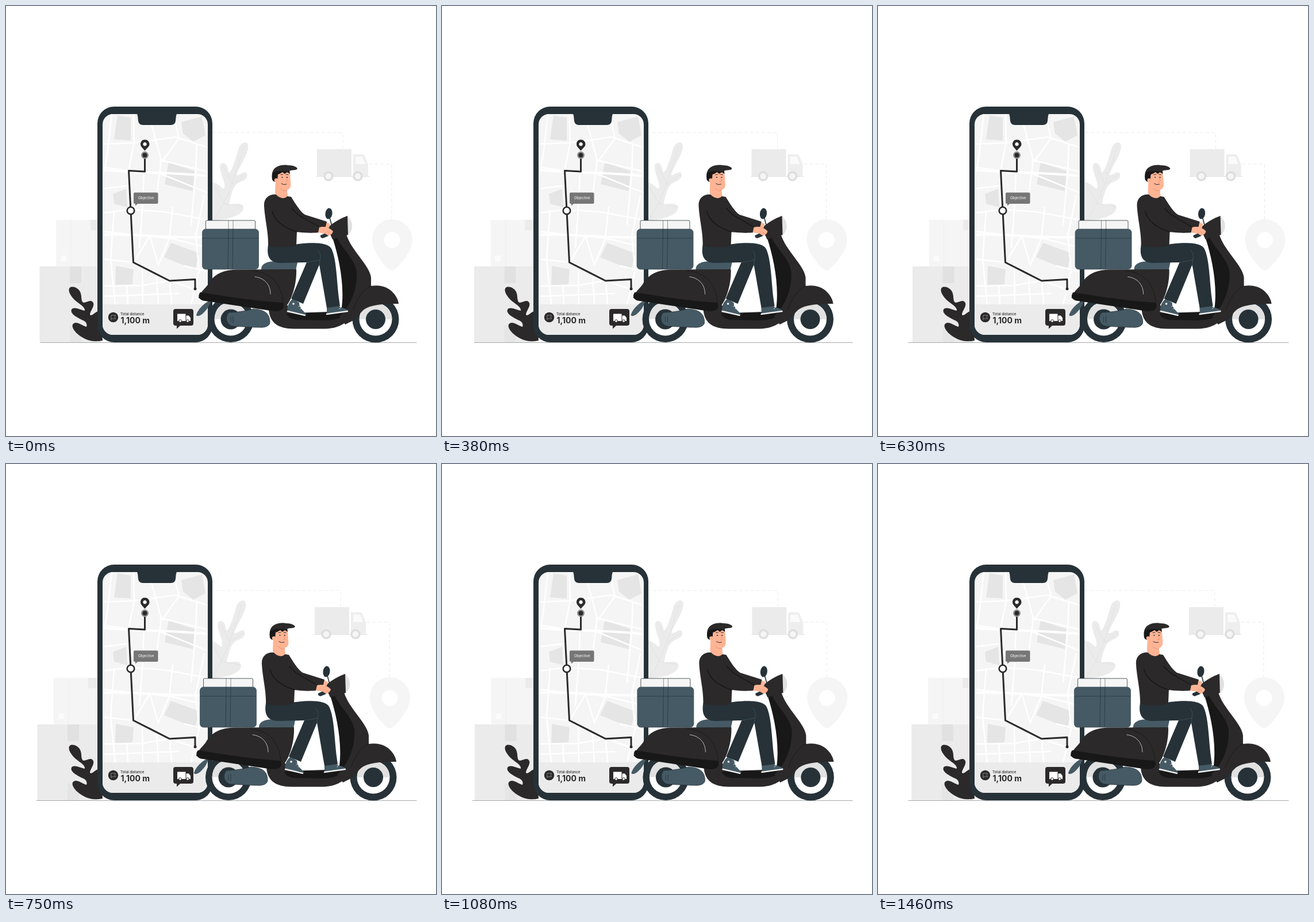
An HTML page for the animation above (1500 ms loop, 748 by 748 pixels).

```html
<!DOCTYPE html>
<html lang="en">
<head>
<meta charset="utf-8">
<style>
html, body { margin: 0; height: 100%; overflow: hidden; background: #fff; }
svg { display: block; width: 100vw; height: 100vh; }
text { font-family: Inter, "Open Sans", sans-serif; }
.ink { fill: #2b2929; }
.navy { fill: #263238; }
.slate { fill: #455a64; }
.black { fill: #191818; }
.skin { fill: #ffb494; }
.g1 { fill: #f5f5f5; }
.g2 { fill: #ebebeb; }
.g3 { fill: #e1e1e1; }
.white { fill: #fff; }
.line { fill: none; stroke-linecap: round; stroke-linejoin: round; }
</style>
</head>
<body>
<svg viewBox="0 0 748 748">
<defs>
  <clipPath id="screen"><rect x="168" y="188" width="183" height="384" rx="18"/></clipPath>
</defs>

<g class="shake">
  <path class="line" d="M359 220H586V249M632 275H671V372" stroke="#ebebeb" stroke-dasharray="5 5" stroke-linecap="butt"/>
  <!-- parcels -->
  <path class="g1" d="M87 372H165V453H87Z"/>
  <path class="g2" d="M147 372H165V390H147Z"/>
  <path class="line" d="M113 373V452" stroke="#ededed" stroke-width=".8"/>
  <path fill="#fbfbfb" d="M95 434H105V444H95Z"/>
  <path class="g2" d="M58.5 453H165V585H58.5Z"/>
  <path class="g3" d="M111 453H131V482H111Z"/>
  <path fill="#e5e5e5" d="M111 556H131V585H111Z"/>
  <!-- pale leaf -->
  <path class="g2" d="M404 250C408 235 424 232 421 248C418 264 402 285 401 294C406 296 416 284 419 292C422 301 412 304 404 308C394 313 390 335 388 345C396 345 412 341 413 350C414 362 392 373 350 374V306C362 304 372 312 378 318C382 316 380 308 378 302C374 290 368 275 377 273C386 273 386 288 388 290C394 286 400 264 404 250Z"/>
  <path class="line" d="M362 372C385 340 400 290 414 245M394 310L378 279M394 310L416 294M380 344L362 312M380 344L411 349" stroke="#dedede" stroke-width=".7"/>
  <!-- van -->
  <path class="g2" d="M541 249H601V297H541Z"/>
  <path fill="#eee" d="M604 297V258H619Q623 258 624 261L630 276V297Z"/>
  <path fill="#fafafa" d="M608 262H620L625 275H608Z"/>
  <path class="line" d="M540 296.500H632" stroke="#e1e1e1" stroke-width="1.200"/>
  <g class="g1" stroke="#dedede" stroke-width="3.500"><circle cx="561" cy="296" r="7"/><circle cx="612" cy="296" r="7"/></g>
  <path class="g1" fill-rule="evenodd" d="M671.500 371C691 371 707 387 707 407C707 425 688 449 676 458Q671.500 462 667 458C655 449 637 425 637 407C637 387 652 371 671.500 371ZM671.500 393a14 14 0 1 0 .1 0Z"/>
</g>

<path id="ground" class="line" stroke="#8f9497" stroke-width=".8"/>

<!-- dark leaf -->
<path class="ink" d="M168 582C152 585 142 582 132 576C117 567 112 555 118 552C124 548 134 557 140 558C142 552 138 548 132 546C122 541 111 535 114 528C118 522 130 529 137 530C138 524 130 520 124 515C114 508 106 495 111 490C116 486 128 491 130 500C132 506 130 514 135 516C140 516 146 511 150 514C157 520 146 530 146 537C150 541 155 530 165 530Z"/>

<!-- phone -->
<rect class="navy" x="159" y="175" width="200" height="410" rx="29"/>
<g clip-path="url(#screen)">
  <path class="g1" d="M168 188H351V572H168Z"/>
  <path fill="#e5e5e5" d="M194 190L217 194V234L188 232ZM305 202L341 192L347 225L326 236L308 222ZM283 272L328 287L325 322L276 310ZM186 327L209 318L211 350L188 344ZM287 412L336 430L329 459L275 437ZM191 452L222 458L220 484L190 487Z"/>
  <path class="line" stroke="#fff" stroke-width="2.500" d="M184 188L176 260L168 300M168 240L222 238L295 228L351 246M222 188L223 238L213 287M248 188L270 268L262 330M295 206L301 230L272 270M168 280L213 287L265 290L351 325M268 268L351 288M332 240L330 290L322 380M168 318L216 312L217 356M168 360L217 354L275 358L350 372M240 290L237 356L232 420M168 392L220 398M188 356L182 440L190 519M168 440L222 446L250 400L290 405L351 420M250 400L265 450M168 487L237 486L284 478L351 500M237 450L238 519M262 470L265 519M290 350L284 405L265 450M345 330L330 400L336 460L322 519M210 486L212 519M351 462L310 452M285 480L288 519M168 505L300 500"/>
  <path class="line" stroke="#fff" stroke-width="4" d="M168 285C230 292 290 288 351 296M168 398C220 395 280 405 351 402"/>
  <path class="g2" d="M168 519H351V572H168Z"/>
  <path class="navy" d="M225 185C230 188 229 192 230 200Q231 207 238 207H287Q294 207 295 200C296 192 295 188 300 185Z"/>
</g>
<path class="line" d="M241.500 260V288L213.500 286.500L221.500 446L284.500 478L329 475.500V492" stroke="#2b2929" stroke-width="3"/>
<circle class="ink" cx="329" cy="492" r="2.500"/>
<circle cx="241.500" cy="259.500" r="6.500" fill="#8f8f8f"/><circle class="ink" cx="241.500" cy="259.500" r="4"/>
<path class="ink" fill-rule="evenodd" d="M241.500 232.500C246 232.500 249.500 236 249.500 240.500C249.500 245 244 248 241.500 252C239 248 234 245 234 240.500C234 236 237 232.500 241.500 232.500ZM241.500 237a3.300 3.300 0 1 0 .1 0Z"/>
<circle class="white" cx="217" cy="356" r="6.300" stroke="#2b2929" stroke-width="2.600"/>
<path fill="#767676" d="M224 324.500H262.500Q264.500 324.500 264.500 326.500V342Q264.500 344 262.500 344H229L225 347.500V344H224Q222 344 222 342V326.500Q222 324.500 224 324.500Z"/>
<text x="230" y="336.300" font-size="6.200" fill="#fff">Objective</text>
<circle class="ink" cx="186.500" cy="541.500" r="8.700"/>
<path class="line" d="M183 546V538H190.500L189 541L190.500 544H183" stroke="#999" stroke-width=".8"/>
<text class="ink" x="199" y="537.700" font-size="6.200" font-weight="500">Total distance</text>
<text class="ink" x="199.500" y="552" font-size="14" font-weight="700">1,100 m</text>
<path class="ink" d="M295 527H322Q326 527 326 531V552Q326 556 322 556H303L297 561.500V556H295Q291 556 291 552V531Q291 527 295 527Z"/>
<path class="white" d="M298 535.500H312.500V548H298ZM313.500 538.500H318L321 542.500V548H313.500Z"/>
<g class="white" stroke="#2b2929"><circle cx="303" cy="548" r="2.300"/><circle cx="316" cy="548" r="2.300"/></g>

<g class="shake">
  <!-- wheels -->
  <g class="navy"><circle cx="391" cy="545" r="40"/><circle cx="643" cy="545" r="40.500"/></g>
  <g class="white"><circle cx="391" cy="545" r="28.500"/><circle cx="643" cy="545" r="28.500"/></g>
  <path class="g3" d="M615 545C615 530 625 517 643 517C661 517 672 531 671.500 545ZM363 545C363 520 383 514 391 516.500C409 517 419 531 419.500 540Z"/>
  <g class="navy"><circle cx="391" cy="545" r="17.500"/><circle cx="643" cy="545" r="17"/></g>
  <path class="slate" d="M357 512C345 515 333 529 331 538C336 543 349 531 354 519Z"/>
  <path class="slate" d="M388 533C380 540 383 556 396 557C415 558 428 559 440 559C452 560 459 556 459 550C459 535 450 528 430 527C415 531 400 533 388 533Z" stroke="#263238" stroke-width=".8"/>
  <path class="line" d="M391 541V550M395 540V551" stroke="#263238" stroke-width=".8"/>

  <!-- scooter body -->
  <path class="ink" d="M457 528C459 552 474 561 500 561.500L555 561.500C586 561 596 545 612 533L605 522L590 531L500 534L485 515Z"/>
  <path class="black" d="M488 535C510 533 550 536 592 530C588 543 575 546 555 547L505 546C495 545 490 540 488 535Z"/>
  <path class="slate" d="M444 459C443 448 455 444 470 444L507 446L504 460Z"/>
  <path class="ink" d="M335 508C337 498 346 492 351 485C362 466 376 460 400 458.500L505 458C506 480 499 505 491 517L482 531L440 526Z"/>
  <path class="black" d="M338 498C333 504 335 512 346 513L460 530C478 533 486 528 482 516C440 514 380 505 338 498Z"/>
  <path class="line" d="M428 460C460 464 478 480 482 515" stroke="#191818" stroke-width=".8"/>
  <path class="line" d="M433 471C449 473 460 484 460 501" stroke="#d0d0d0" stroke-width=".9"/>

  <!-- cargo case -->
  <rect x="347.500" y="373" width="86" height="18" rx="2" class="g1" stroke="#263238" stroke-width=".8"/>
  <path class="line" d="M387 373V388M395 373V388" stroke="#777" stroke-width=".8"/>
  <rect class="slate" x="341.500" y="388" width="98" height="70" rx="6" stroke="#37474f" stroke-width=".7"/>
  <path class="line" d="M342 404H439M387 388L386 457M395 388L394 457" stroke="#263238" stroke-width=".7"/>

  <!-- front shield and fender -->
  <path class="g3" d="M593 365C605 374 605 391 594 399Z"/>
  <path class="black" d="M568 403C580 440 590 490 583 531L600 530C620 500 615 440 590 400Z"/>
  <path class="ink" d="M576 404L592 397C600 425 632 450 635 472L635 487C664 482 681 502 683 518C660 518 640 519 628 525C615 531 612 545 604 547L590 554L580 540C600 522 612 490 610 462C607 442 590 428 576 404Z"/>
  <path class="line" d="M635 487C622 492 610 510 604 528" stroke="#191818" stroke-width=".8"/>
  <path class="ink" d="M559 386C570 376 583 369 594 365L595 398L568 406Z"/>

  <!-- mirror -->
  <path class="line" d="M563 368L567 383" stroke="#263238" stroke-width="1.600"/>
  <ellipse class="navy" cx="561.500" cy="361" rx="6" ry="9.500" transform="rotate(8 561 361)"/>

  <!-- shoes -->
  <path class="slate" d="M499 509L510 516C510 526 518 530 523 537L490 531C488 524 492 515 499 509Z"/>
  <path class="slate" d="M558 523L578 521C582 526 592 525 595 530L558 536Z"/>
  <path class="line" d="M490 531L520 538M558 536L594 531" stroke="#f0f0f0" stroke-width="2.400"/>
  <path class="line" d="M509 523L514 520M512 527L517 524M580 527L583 523" stroke="#fff" stroke-width=".8"/>
  <circle cx="500" cy="518" r="1.800" fill="#fff"/>

  <!-- rider -->
  <path class="navy" d="M456 416C470 420 490 418 508 414C535 411 562 411 567 424C576 445 575 485 581 522L558 525L545 450L517 518L496 509L523 446L478 447C458 447 453 435 456 416Z"/>
  <path class="line" d="M523 446L546 442Q549 432 543 425M546 442L545 452" stroke="#455a64" stroke-width=".7"/>
  <path class="skin" d="M555 375L564 379L562 386L553 385Z"/>
  <path class="ink" d="M472 328C458 326 448 334 449 348C450 370 457 395 456 417C470 421 495 420 505 417L506 393C522 395 535 395 544 394L547 386L556 384L558 375L520 363C511 357 503 343 496 332Z"/>
  <path class="line" d="M463 357C468 375 484 386 506 393M497 352L508 363L544 384" stroke="#151414" stroke-width="1.200"/>
  <path class="navy" d="M547 399L558 394L561 400L551 404Q546 403 547 399Z"/>
  <path class="skin" d="M545 385C555 382 565 387 569 392C567 399 562 398 561 400L555 396L543 394Z"/>
  <path class="line" d="M558 391L565 397M555 393L561 399" stroke="#e58e72" stroke-width=".7"/>
  <path class="skin" d="M469 299L468 325C473 335 486 337 490 330L488 316Z"/>
  <path class="skin" d="M472 289C478 284 493 286 494 292L495.500 311C495 320 487 322 481 319C472 314 469 300 472 289Z"/>
  <path class="line" d="M478 318Q484 323 489 321" stroke="#e99578" stroke-width="1"/>
  <path class="black" d="M463 302C461 288 466 280 476 279L493 284L494 292L489 289L485 292L481 289L476 292L473 293L472 304C469 307 465 306 463 302Z"/>
  <circle class="skin" cx="470" cy="303" r="3.200"/>
  <path class="ink" d="M464 290C465 279 480 275 490 277C500 277 506 280 507 283C504 287 497 284 491 288C480 287 472 286 464 290Z"/>
  <path class="line" d="M478 293.500L482 293M487 293L491 293.500M479 309Q483 312 488 310" stroke="#263238" stroke-width="1"/>
  <path class="line" d="M487 297L489.500 305L486 306" stroke="#e58e72" stroke-width=".8"/>
  <g class="navy"><circle cx="480.500" cy="298" r="1.100"/><circle cx="489" cy="298" r="1.100"/></g>
</g>
</svg>
<script>
const LOOP = 1500, FRAMES = 36;
const keys = [0, -1, 2, -4, 4, -4, 4, -4, 2, -1, 0];
const groups = document.querySelectorAll('.shake');
const ground = document.getElementById('ground');
const easeOut = x => 1 - (1 - x) ** 2;

function shakeAt(p) {
  const i = Math.floor(p * 10);
  return keys[i] + (keys[i + 1] - keys[i]) * easeOut(p * 10 - i);
}

function draw(now) {
  const frame = Math.floor((now % LOOP + 4) / LOOP * FRAMES) % FRAMES;
  const p = frame / FRAMES;
  const dx = shakeAt(p).toFixed(2);
  groups.forEach(g => g.setAttribute('transform', `translate(${dx} 0)`));
  // The ground line starts shorter and reaches full length early in the loop.
  const left = p < .1 ? 60 : p < .28 ? 56 : 53;
  ground.setAttribute('d', `M${left} 585.500H714`);
  requestAnimationFrame(() => draw(performance.now()));
}
draw(performance.now());
</script>
</body>
</html>
```
